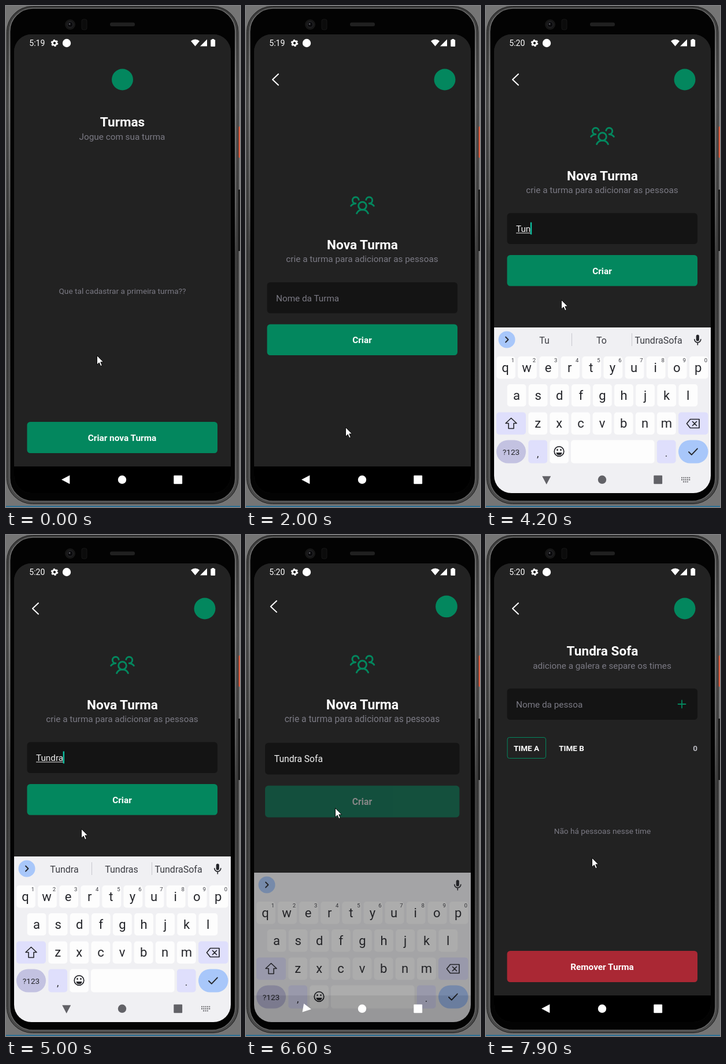
Recreate the animation shown at these times as an HTML page. Size 405 px wide and 865 px high, loop 8 s.

```html
<!DOCTYPE html>
<html lang="pt-BR">
<head>
<meta charset="utf-8">
<title>Turmas</title>
<style>
  html, body { margin: 0; width: 100%; height: 100%; overflow: hidden; background: #757575; }
  svg { display: block; width: 405px; height: 865px; }
  text { font-family: Roboto, "Open Sans", sans-serif; white-space: pre; }
  .mid { text-anchor: middle; }
  .title { font-size: 22.6px; font-weight: 700; fill: #fff; text-anchor: middle; }
  .sub { font-size: 15.3px; fill: #7b7a84; }
  .small { font-size: 13.65px; fill: #7b7a84; text-anchor: middle; }
  .label { font-size: 15.35px; font-weight: 700; fill: #fff; text-anchor: middle; }
  .tab { font-size: 13.5px; font-weight: 700; fill: #fff; text-anchor: middle; }
  .green { fill: #03875e; }
  .field { fill: #141414; }
  .bg { fill: #222; }
  .line { fill: none; stroke-linecap: round; stroke-linejoin: round; }
  .key { font-size: 22px; fill: #24252a; text-anchor: middle; }
  .hint { font-size: 9.5px; fill: #3c3d44; text-anchor: middle; }
  .word { font-size: 16px; fill: #3b3c42; text-anchor: middle; }
</style>
</head>
<body>
<svg viewBox="0 0 405 865">
  <defs>
    <clipPath id="glass"><rect x="14" y="49" width="375" height="792" rx="30"/></clipPath>
    <clipPath id="stripEnd"><rect x="254" y="560" width="94" height="34"/></clipPath>
    <linearGradient id="rim" x1="0" y1="0" x2="0" y2="1">
      <stop offset="0" stop-color="#6a6a6a"/><stop offset=".15" stop-color="#999"/>
      <stop offset=".4" stop-color="#707070"/><stop offset=".5" stop-color="#444"/>
      <stop offset="1" stop-color="#666"/>
    </linearGradient>
    <linearGradient id="metal" x1="0" y1="0" x2="0" y2="1">
      <stop offset="0" stop-color="#3a3a3a"/><stop offset=".2" stop-color="#555"/>
      <stop offset=".5" stop-color="#3c3c3c"/><stop offset="1" stop-color="#4a4a4a"/>
    </linearGradient>
    <g id="header">
      <path class="line" d="M56 117.5L46 127L56 136.5" stroke="#fff" stroke-width="2"/>
      <circle class="green" cx="344" cy="127" r="18.5"/>
    </g>
  </defs>

  <!-- device -->
  <rect width="405" height="865" fill="#757575"/>
  <rect y="863" width="405" height="2" fill="#2c6f94"/>
  <rect x="402" y="208" width="6" height="54" rx="2" fill="#d95f42"/>
  <rect x="401" y="317" width="4" height="106" fill="#1b1b1b"/>
  <rect x="1.5" y="0.5" width="400.5" height="859" rx="44" fill="url(#metal)" stroke="#1c1c1c"/>
  <rect x="6.5" y="4" width="390.5" height="851" rx="40" fill="#030303" stroke="url(#rim)" stroke-width="1.6"/>
  <circle cx="111" cy="32" r="9" fill="#161616"/>
  <circle cx="111" cy="32" r="5" fill="#0a0a0c" stroke="#2a2a2e"/>
  <circle cx="110" cy="31" r="1.5" fill="#55555a"/>
  <rect x="131" y="23" width="9" height="18" rx="3" fill="#0b0b0b" stroke="#171717"/>
  <rect x="180" y="28.5" width="43" height="6.5" rx="3" fill="#202020"/>

  <g clip-path="url(#glass)">
    <rect class="bg" x="14" y="49" width="375" height="792"/>

    <g id="home">
      <rect class="bg" x="14" y="49" width="375" height="746"/>
      <circle class="green" cx="201.5" cy="127" r="18.5"/>
      <text class="title" x="201.5" y="208">Turmas</text>
      <text class="sub mid" x="201" y="230.5">Jogue com sua turma</text>
      <text class="small" x="201.5" y="497">Que tal cadastrar a primeira turma??</text>
      <g id="newBtn">
        <rect class="green" x="36.5" y="718" width="329.5" height="54" rx="5.5"/>
        <text class="label" x="201" y="751">Criar nova Turma</text>
      </g>
    </g>

    <g id="form">
      <rect class="bg" x="14" y="49" width="375" height="746"/>
      <use href="#header"/>
      <g id="body">
        <g class="line" transform="translate(179.6 321.1) scale(.171)" stroke="#03875e" stroke-width="17">
          <circle cx="128" cy="140" r="40"/>
          <path d="M196 116a60 60 0 0 1 48 24M12 140a60 60 0 0 1 48-24M70 216a64 64 0 0 1 116 0M60 116A32 32 0 1 1 91 78M165 78A32 32 0 1 1 196 116"/>
        </g>
        <text class="title" x="201.5" y="420">Nova Turma</text>
        <text class="sub mid" x="201" y="442">crie a turma para adicionar as pessoas</text>
        <rect class="field" x="36.5" y="477" width="329.5" height="53.5" rx="5.5"/>
        <text class="sub" id="hint" x="52" y="509.5">Nome da Turma</text>
        <text class="sub" id="typed" x="52" y="509.5" style="fill:#f2f2f2"></text>
        <rect id="under" y="511" height="1" fill="#e6e6e6"/>
        <rect id="caret" y="493" width="2.4" height="21" fill="#0cbfa0"/>
        <g id="okBtn">
          <rect class="green" x="36.5" y="549.5" width="329.5" height="53.5" rx="5.5"/>
          <text class="label" x="201" y="582">Criar</text>
        </g>
      </g>
    </g>

    <g id="team">
      <rect class="bg" x="14" y="49" width="375" height="746"/>
      <use href="#header"/>
      <text class="title" x="201.5" y="208">Tundra Sofa</text>
      <text class="sub mid" x="201" y="230.5">adicione a galera e separe os times</text>
      <rect class="field" x="36.5" y="265" width="329.5" height="54" rx="5.5"/>
      <text class="sub" x="52" y="297.5">Nome da pessoa</text>
      <path class="line" d="M332.5 292H345.5M339 285.5V298.5" stroke="#03875e" stroke-width="1.8"/>
      <rect x="37" y="349.5" width="66.5" height="36" rx="3.5" fill="none" stroke="#03875e"/>
      <text class="tab" x="70" y="373">TIME A</text>
      <text class="tab" x="148" y="373">TIME B</text>
      <text class="tab" x="366" y="373" style="text-anchor:end;fill:#b9b9c0">0</text>
      <text class="small" x="201.5" y="515.5">Não há pessoas nesse time</text>
      <rect x="36.5" y="718" width="329.5" height="54" rx="5.5" fill="#aa2834"/>
      <text class="label" x="201" y="751">Remover Turma</text>
    </g>

    <rect x="14" y="795" width="375" height="46" fill="#000"/>
    <rect id="gap" x="14" y="555" width="375" height="286" fill="#fff"/>

    <g id="board">
      <rect x="14" y="555" width="375" height="330" fill="#f0f0f3"/>
      <circle cx="36" cy="576" r="14.5" fill="#a8c7fa"/>
      <path class="line" d="M34 571.5L38.5 576L34 580.5" stroke="#24252a" stroke-width="1.8"/>
      <rect x="363.7" y="567.5" width="5.2" height="11" rx="2.6" fill="#24252a"/>
      <path class="line" d="M360.8 575.5a5.5 5.5 0 0 0 11 0M366.3 581.5V585" stroke="#24252a" stroke-width="1.6"/>
      <g id="chip">
        <rect x="136.5" y="561.5" width="136" height="30" rx="6" fill="#fafafd" stroke="#d6d6dc"/>
        <rect x="147.5" y="570.5" width="11" height="13" rx="1.5" fill="#dfe9fd" stroke="#6f9be8" stroke-width="1.3"/>
        <rect x="150.5" y="568.5" width="5" height="3.5" rx="1" fill="#6f9be8"/>
        <path d="M150 575.5H156M150 578H156M150 580.5H154" stroke="#6f9be8"/>
        <text x="166.5" y="581.5" font-size="13.3" fill="#2c2d33">QX571830264...</text>
      </g>
      <g id="strip">
        <path d="M148.5 565V587M252.5 565V587" stroke="#c8c8ce"/>
        <text class="word" x="101" y="582.5"></text>
        <text class="word" x="200" y="582.5"></text>
        <text class="word" x="298.5" y="582.5" clip-path="url(#stripEnd)"></text>
        <g id="seats">
          <path d="M298.5 565V587" stroke="#c8c8ce"/>
          <path class="line" d="M271 570L273.5 578H281" stroke="#3f79a8" stroke-width="5"/>
          <path class="line" d="M274 574H281M276 581L273 584H282" stroke="#22405c" stroke-width="2"/>
          <path class="line" d="M318 568V584M318 577H327V584M323 577V583" stroke="#8d4a2b" stroke-width="2"/>
          <rect x="317" y="568" width="9" height="6" rx="1" fill="#c87843"/>
          <rect x="317" y="576" width="12" height="3" fill="#e0954f"/>
        </g>
      </g>
      <g id="keys"></g>
      <path id="shift" d="M43.5 711.5L53 720.5H48V729.5H39V720.5H34Z" stroke="#24252a" stroke-width="1.6" stroke-linejoin="round"/>
      <path class="line" d="M353.5 713.5H369V728.5H353.5L347.5 721ZM357.5 717.5L364.5 724.5M364.5 717.5L357.5 724.5" stroke="#24252a" stroke-width="1.7"/>
      <text x="43.5" y="774.5" font-size="13.6" class="mid" fill="#24252a">?123</text>
      <text x="89.7" y="779" font-size="17" class="mid" fill="#24252a">,</text>
      <text x="312" y="778" font-size="17" class="mid" fill="#24252a">.</text>
      <circle cx="126.5" cy="769" r="8.3" fill="none" stroke="#24252a" stroke-width="1.7"/>
      <path d="M121.5 771h10a5 4.6 0 0 1-10 0Z" fill="#24252a"/>
      <circle cx="123.5" cy="766.5" r="1.4" fill="#24252a"/><circle cx="129.5" cy="766.5" r="1.4" fill="#24252a"/>
      <path class="line" d="M351 770l4.8 4.8 10-10.5" stroke="#24252a" stroke-width="1.9"/>
    </g>

    <g id="nav">
      <path id="back" d="M96 817.7L110.3 810.2V825.2Z"/>
      <circle cx="201" cy="817.8" r="7.2"/>
      <rect x="290.3" y="810.5" width="14.8" height="14.8" rx="1"/>
      <path id="ime" d="M338 814.5H354M338 818H354M341 821.5H351" fill="none" stroke="#6a6a6e" stroke-width="1.8" stroke-dasharray="2 1.3"/>
    </g>

    <g fill="#fff">
      <text id="clock" x="40.3" y="69" font-size="14">5:19</text>
      <circle cx="84" cy="64" r="3.6" fill="none" stroke="#fff" stroke-width="2.8"/>
      <circle cx="84" cy="64" r="5.4" fill="none" stroke="#fff" stroke-width="1.8" stroke-dasharray="2.9 2.75"/>
      <circle cx="105" cy="64" r="7.2"/>
      <path d="M320 60.5Q327.5 54.5 335 60.5L327.5 69.5ZM348 57.5V69.5H336Z"/>
      <rect x="354.3" y="58.2" width="7.8" height="11.8" rx="1"/>
      <rect x="356.3" y="57" width="3.8" height="2"/>
    </g>
  </g>

  <path id="mouse" d="M.5.5V16.2L4.2 12.8L6.8 18.7L9.3 17.6L6.8 11.8H11.6Z" fill="#fff" stroke="#000" stroke-width=".9"/>
</svg>

<script>
const $ = id => document.getElementById(id);
const set = (el, attrs) => { for (const k in attrs) el.setAttribute(k, attrs[k]); };
const show = (el, on) => { el.style.display = on ? "" : "none"; };

function add(tag, attrs, text) {
  const el = document.createElementNS("http://www.w3.org/2000/svg", tag);
  set(el, attrs);
  if (text) el.textContent = text;
  $("keys").append(el);
  return el;
}

// Keyboard
const PITCH = 37.1, letters = [];
const cap = (x, y, w, h, fill = "#fdfdfd", rx = 5) => add("rect", { x, y, width: w, height: h, rx, fill });
[["qwertyuiop", 34.4, 605], ["asdfghjkl", 53, 653], ["zxcvbnm", 89.7, 701.5]].forEach(([row, x0, y], r) => {
  [...row].forEach((ch, i) => {
    const x = x0 + PITCH * i;
    cap(x - 16.4, y, 32.8, 38.5);
    letters.push(add("text", { class: "key", x: r ? x : x - 1, y: y + 26.5 }, ch));
    if (!r) add("text", { class: "hint", x: x + 12, y: y + 10 }, String((i + 1) % 10));
  });
});
const LILAC = "#dfdffc";
cap(18, 701.5, 51, 38.5, LILAC);
cap(333, 701.5, 51.5, 38.5, LILAC);
cap(18, 749.5, 51, 40, "#c3c2e1", 20);
cap(73.3, 749.5, 32.8, 40, LILAC);
cap(110.2, 749.5, 32.8, 40);
cap(147, 749.5, 144.5, 40);
cap(295.8, 749.5, 32.8, 40, LILAC);
cap(333, 749.5, 51.5, 40, "#a8c7fa", 20);

// Timelines: [ms, value...]
const TYPED = [[0, ""], [3600, "T"], [4000, "Tu"], [4200, "Tun"], [4600, "Tund"], [4800, "Tundr"], [5000, "Tundra"],
  [5200, "Tundra "], [5400, "Tundra S"], [5600, "Tundra So"], [5700, "Tundra Sof"], [5800, "Tundra Sofa"]];
const WORDS = [[0, ""], [3600, "T,To,Tu"], [4000, "Tu,To,TundraSofa"], [4400, "Tun,Ton,TundraSofa"],
  [4700, "Tund,Tunda,Tundra"], [5000, "Tundra,Tundras,TundraSofa"], [5200, "Sofa,and,is"],
  [5500, "S,So,Sofa"], [5700, "So,Sofa,Soft"], [5900, "Sofa,Sofas,"], [6500, ""]];
const MOUSE = [[0, 157, 603], [100, 163, 628], [200, 163, 628], [300, 185, 560], [500, 300, 304], [700, 348, 520],
  [900, 260, 806], [1100, 182, 742], [1600, 178, 736], [2000, 172, 727], [2400, 130, 507], [6100, 130, 507],
  [6400, 154, 471], [6600, 154, 471], [7000, 154, 478], [7400, 154, 478], [7500, 154, 480], [7600, 154, 480],
  [7900, 183, 557], [8000, 183, 557]];
const BOARD = [[0, 300], [2700, 230], [2800, 130], [2900, 50], [3000, 10], [3100, 0], [6600, 28], [6700, 120], [6800, 300]];
const TURN = [[0, 0], [2700, 30], [2800, 75], [2900, 130], [3000, 180], [3100, 270], [6600, 190], [6700, 90], [6800, 30], [6900, 0]];
const PRESS = [[0, 1], [0.1, 0.3], [100, 0.2], [200, 0.45], [300, 0.8], [400, 1]];
const LEAVE = [[-9e3, 1], [0, 1.021], [100, 1.09]];
const ENTER = [[-9e3, 0.85], [100, 0.95], [200, 0.985], [300, 0.996], [400, 1]];

const at = (list, t) => list.reduce((v, [ms, x]) => ms <= t ? x : v, list[0][1]);
function glide(list, t) {
  const i = Math.max(1, list.findIndex(p => p[0] >= t));
  const [a, x, y] = list[i - 1], [b, u, v] = list[i];
  const k = (t - a) / (b - a);
  return [x + (u - x) * k, y + (v - y) * k];
}

const NEXT1 = 1400, NEXT2 = 6600;
function place(el, scale, alpha, cy) {
  show(el, alpha > 0);
  set(el, { opacity: alpha, transform: `translate(201.5 ${cy}) scale(${scale}) translate(-201.5 ${-cy})` });
}
const fadeIn = d => d < 100 ? 0 : d < 200 ? 0.9 : 1;
const fadeOut = d => d < 100 ? 1 : d < 200 ? 0.15 : 0;

function drawField(t) {
  const text = at(TYPED, t), el = $("typed");
  el.textContent = text;
  const width = text ? el.getComputedTextLength() : 0;
  const start = text.indexOf(" ") + 1;
  const from = start && start < text.length ? el.getSubStringLength(0, start) : 0;
  const composing = text && !text.endsWith(" ") && t < 6400;
  show($("hint"), !text);
  show($("under"), composing);
  set($("under"), { x: 52 + from, width: Math.max(0, width - from) });
  show($("caret"), t >= 2700 && t < 6400 && !(t >= 3300 && t < 3600));
  set($("caret"), { x: 51.5 + width });
}

function drawBoard(t) {
  const drop = at(BOARD, t), open = t >= 2700 && t < 6800;
  const typing = t >= 3600;
  show($("gap"), t >= 2800 && t < 3100);
  show($("board"), open);
  set($("board"), { transform: `translate(0 ${drop})`, opacity: t < 6600 ? 1 : t < 6700 ? 0.63 : 0.2 });
  show($("chip"), !typing);
  const words = at(WORDS, t).split(",");
  show($("strip"), words.length > 1);
  document.querySelectorAll(".word").forEach((el, i) => { el.textContent = words[i] || ""; });
  show($("seats"), words[2] === "");
  letters.forEach(el => {
    el.textContent = typing ? el.textContent.toLowerCase() : el.textContent.toUpperCase();
  });
  set($("shift"), { fill: typing ? "none" : "#24252a" });

  const light = t >= 2700 && t < 6600;
  set($("nav"), { fill: light ? "#626267" : "#fff" });
  set($("back"), { transform: `rotate(${at(TURN, t)} 104.5 817.5)` });
  show($("ime"), t >= 2900 && t < 6600);
}

function draw(t) {
  const a = t - NEXT1, b = t - NEXT2;
  place($("home"), at(LEAVE, a), fadeOut(a), 422);
  place($("form"), b < 0 ? at(ENTER, a) : at(LEAVE, b), b < 0 ? fadeIn(a) : fadeOut(b), b < 0 ? 422 : 297);
  place($("team"), at(ENTER, b), fadeIn(b), 422);
  set($("body"), { transform: `translate(0 ${t >= 2800 ? -119.5 : 0})` });
  set($("newBtn"), { opacity: at(PRESS, t - 1200) });
  set($("okBtn"), { opacity: at(PRESS, t - 6400) });
  $("clock").textContent = t < 2300 ? "5:19" : "5:20";
  drawField(t);
  drawBoard(t);
  const [x, y] = glide(MOUSE, t);
  set($("mouse"), { transform: `translate(${Math.round(x)} ${Math.round(y)})` });
}

// The picture advances ten times a second.
const STEP = 100, LOOP = 8000, begin = performance.now();
let last = -1;
function tick() {
  const t = Math.floor(((performance.now() - begin + 8) % LOOP) / STEP) * STEP;
  if (t !== last) draw(last = t);
  requestAnimationFrame(tick);
}
tick();
</script>
</body>
</html>
```
